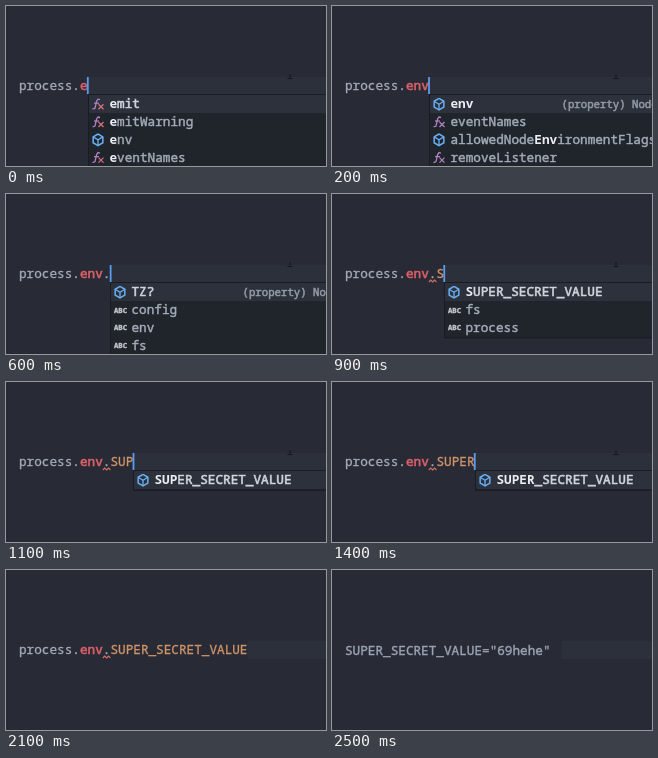
Animation of 320x160 px, one loop 3 s. Source, as an HTML page with a canvas:

```html
<!DOCTYPE html>
<html lang="en">
<head>
<meta charset="utf-8">
<title>Autocomplete</title>
<style>
  html, body { margin: 0; height: 100%; overflow: hidden; background: #282b35; }
  canvas { display: block; }
</style>
</head>
<body>
<canvas width="320" height="160"></canvas>
<script>
const ctx = document.querySelector('canvas').getContext('2d');
const LOOP = 3000, STEP = 100, SIZE = 12.7, CHAR = SIZE * 0.6, LEFT = 13, ROW = 17.8;
const GREY = '#a4abb9', RED = '#dc6069', ORANGE = '#cf9468', BLUE = '#5c9cf0', PURPLE = '#b183c4';

const SECRET = 'SUPER_SECRET_VALUE';
const secretRow = ['cube', SECRET];
const emitters = [['fxRed', 'emit'], ['fxRed', 'emitWarning'], ['cube', 'env'], ['fxRed', 'eventNames']];
const envRows = [['cube', 'env', '(property) NodeJS'], ['fx', 'eventNames'],
  ['cube', 'allowedNodeEnvironmentFlags'], ['fx', 'removeListener']];
const members = [['cube', 'TZ?', '(property) NodeJS'], ['abc', 'config'], ['abc', 'env'], ['abc', 'fs']];
const matches = [secretRow, ['abc', 'fs'], ['abc', 'process']];

// start time, text after "process.", suggestions
const states = [
  [0, 'e', emitters], [100, 'en', envRows], [200, 'env', envRows], [600, 'env.', members],
  [900, 'env.S', matches], [1000, 'env.SU', [secretRow]], [1100, 'env.SUP', [secretRow]],
  [1200, 'env.SUPE', [secretRow]], [1300, 'env.SUPER', [secretRow]], [1600, 'env.' + SECRET, []]
];

const ramp = (t, from, to) => Math.min(1, Math.max(0, (t - from) / (to - from)));

function box(x, y, w, h, color) {
  ctx.fillStyle = color;
  ctx.fillRect(x, y, w, h);
}

// A thin outline of width `heavy` gives weights between regular and bold.
function text(str, x, y, color, heavy = 0.3, weight = 400, size = SIZE) {
  ctx.font = `${weight} ${size}px "Noto Sans Mono", "DejaVu Sans Mono", monospace`;
  ctx.fillStyle = ctx.strokeStyle = color;
  ctx.lineWidth = heavy;
  ctx.fillText(str, x, y);
  if (heavy) ctx.strokeText(str, x, y);
  return x + str.length * size * 0.6;
}

function line(points, color, width) {
  ctx.beginPath();
  points.forEach(([x, y]) => ctx.lineTo(x, y));
  ctx.strokeStyle = color;
  ctx.lineWidth = width;
  ctx.stroke();
}

function icon(kind, x, y) {
  if (kind === 'cube') {
    const corner = i => [x + 6 + 5.6 * Math.sin(i * Math.PI / 3), y - 5.8 * Math.cos(i * Math.PI / 3)];
    line([0, 1, 2, 3, 4, 5, 6].map(corner), '#69b0f5', 1.5);
    line([corner(5), [x + 6, y], corner(1)], '#69b0f5', 1.3);
    line([[x + 6, y], corner(3)], '#69b0f5', 1.3);
  } else if (kind === 'abc') {
    text('ABC', x, y + 2.5, '#c3c6cc', 0.4, 700, 7.2);
  } else {
    const color = kind === 'fxRed' ? '#d9707f' : PURPLE;
    line([[x + 8, y - 4.5], [x + 6, y - 5], [x + 4.6, y - 3], [x + 3, y + 4], [x + 0.5, y + 5]], PURPLE, 1.3);
    line([[x + 2, y - 1], [x + 7, y - 1]], PURPLE, 1.2);
    line([[x + 6.5, y], [x + 11.5, y + 5]], color, 1.3);
    line([[x + 11.5, y], [x + 6.5, y + 5]], color, 1.3);
  }
}

function popup(rows, left, query) {
  if (!rows.length) return;
  const height = rows.length * ROW;
  box(left, 88, 320 - left, height + 3, '#191c22');
  box(left + 1, 89, 319 - left, height + 1, '#20242b');
  box(left + 1, 89, 319 - left, 18, '#2c313b');
  rows.forEach(([kind, label, detail], i) => {
    const y = 102.2 + i * ROW, color = i ? GREY : '#d0d4dc', heavy = i ? 0.45 : 0.6;
    icon(kind, left + 4, y - 4);
    let at = label.indexOf(query);
    if (at < 0) at = label.indexOf(query[0].toUpperCase() + query.slice(1));
    if (at < 0) at = label.length;
    let x = text(label.slice(0, at), left + 21.5, y, color, heavy);
    x = text(label.slice(at, at + query.length), x, y, '#eceef2', 0, 700);
    text(label.slice(at + query.length), x, y, color, heavy);
    if (detail) text(detail, left + 132.5, y - 0.3, '#959ca8', 0.5, 400, 10.7);
  });
}

function editor(typed) {
  const [name, member] = typed.split('.');
  let x = text('process.', LEFT, 83.5, GREY);
  x = text(name, x, 83.5, RED, 0.6);
  if (member === undefined) return;
  if (member) line([0, 1, 2, 3, 4].map(i => [x + i * 1.9, 88 - i % 2 * 2]), '#d5705f', 1.1);
  x = text('.', x, 83.5, GREY);
  text(member, x, 83.5, ORANGE);
}

function draw(t) {
  const [, typed, rows] = states.filter(s => s[0] <= t).pop();
  const caret = LEFT + (8 + typed.length) * CHAR;
  const swap = ramp(t, 2200, 2500);
  box(0, 0, 320, 160, '#282b35');
  box(swap ? 230 : caret, 71, 320, 18, '#2b303a');

  ctx.globalAlpha = 1 - swap;
  editor(typed);
  ctx.globalAlpha = swap;
  text(SECRET + '="69hehe"', LEFT, 85.2, '#9ba3b3', 0.4);

  ctx.globalAlpha = 1 - ramp(t, 1800, 2100);
  box(caret - 0.7, 71, 1.8, 17, BLUE);
  box(283.5, 68, 1, 5, '#14161b');
  box(281.5, 72, 5, 1, '#14161b');
  ctx.globalAlpha = 1;
  popup(rows, Math.round(caret), typed.split('.').pop());
}

function frame() {
  draw(Math.floor(performance.now() % LOOP / STEP) * STEP);
  requestAnimationFrame(frame);
}
frame();
</script>
</body>
</html>
```
